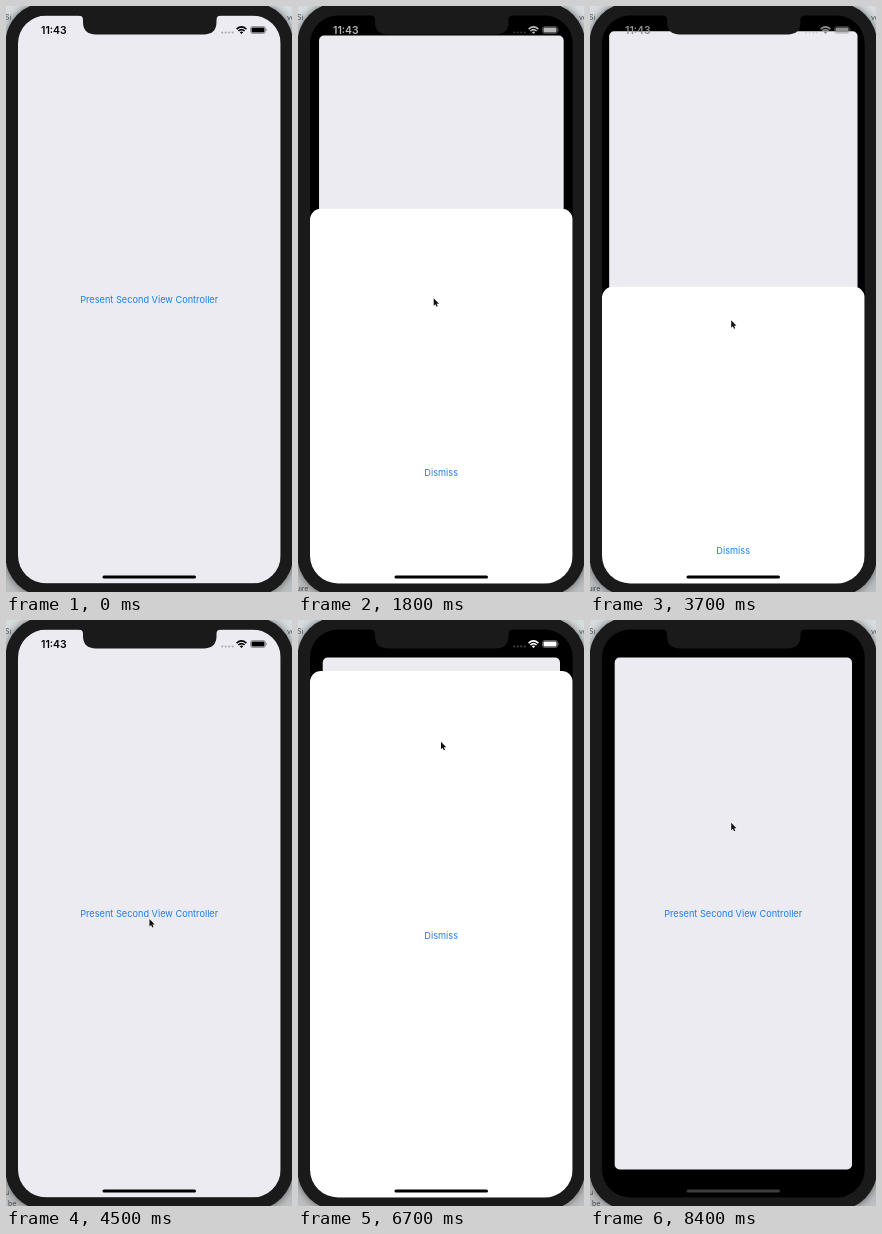
Animation, 286 px wide and 586 px high, one loop 8800 ms. Source, as an HTML page:

```html
<!DOCTYPE html>
<html lang="en">
<head>
<meta charset="utf-8">
<title>Modal sheet</title>
<style>
  html, body { margin: 0; width: 100%; height: 100%; overflow: hidden; background: #c4cacd; }
  svg { display: block; width: 286px; height: 586px; }
  text { font-family: Inter, Roboto, sans-serif; }
  .link { font-size: 9.2px; fill: #1a7ff0; text-anchor: middle; }
  .clock { font-size: 10.4px; font-weight: 600; }
  .desk { font-size: 7px; fill: #45484a; }
</style>
</head>
<body>
<svg viewBox="0 0 286 586">
  <defs>
    <clipPath id="screen"><rect x="12" y="9.5" width="262.7" height="568" rx="28"/></clipPath>
    <linearGradient id="desk" x2="0" y2="1">
      <stop offset="0" stop-color="#d6dde0"/>
      <stop offset="1" stop-color="#bcbfc1"/>
    </linearGradient>
    <filter id="soft" x="-10%" y="-10%" width="120%" height="120%">
      <feGaussianBlur stdDeviation="4"/>
    </filter>
  </defs>

  <rect width="286" height="586" fill="url(#desk)"/>
  <rect x="-.5" y="-3" width="287.5" height="593" rx="40" fill="#000" opacity=".55" filter="url(#soft)"/>
  <text class="desk" x="-1" y="14">Si</text>
  <text class="desk" x="281" y="14">ve</text>
  <text class="desk" id="logA" x="-2" y="585">uire</text>
  <g class="desk" id="logB"><text x="-1" y="575">u</text><text x="2" y="586">be</text></g>
  <rect x="-.5" y="-3" width="287.5" height="593" rx="40" fill="#1a1a1a"/>

  <g clip-path="url(#screen)">
    <rect width="286" height="586" fill="#000"/>
    <rect id="card" rx="5" fill="#ebebf1"/>
    <text class="link" id="present" x="143.2" y="297.1">Present Second View Controller</text>
    <g id="sheet">
      <rect x="12" width="262.7" height="640" rx="11" fill="#fff"/>
      <text class="link" id="dismiss" x="143.2" y="267.6">Dismiss</text>
    </g>
    <text class="clock" id="clock" x="35" y="27.6">11:43</text>
    <g id="icons">
      <path d="M216.2 26.5H227" fill="none" stroke="currentColor" stroke-width="2.2" stroke-linecap="round" stroke-dasharray="0 3.5" opacity=".28"/>
      <g fill="none" stroke="currentColor" stroke-width="1.6">
        <path d="M230.6 23.1Q235.5 18.8 240.4 23.1"/>
        <path d="M232.4 25Q235.5 22.3 238.6 25"/>
      </g>
      <path d="M233.8 26.2Q235.5 24.9 237.2 26.2L235.5 28Z"/>
      <rect x="244.5" y="20.5" width="15" height="7" rx="2" fill="none" stroke="currentColor" stroke-width=".7" opacity=".5"/>
      <rect x="245.5" y="21.5" width="13" height="5" rx="1.1"/>
      <path d="M260.4 22.6Q262 24 260.4 25.4Z" opacity=".5"/>
    </g>
    <rect id="home" x="96.5" y="569.5" width="93.5" height="3" rx="1.5"/>
  </g>
  <path d="M73 8.5V9.5Q77 9.5 77 14V16Q77 28.4 90 28.4H197.5Q210.5 28.4 210.5 16V14Q210.5 9.5 214.5 9.5V8.5Z" fill="#1a1a1a"/>
  <g id="cursor">
    <path transform="translate(.7 .3) scale(.88)" d="M0 0V8.4L1.9 6.7 3.2 9.7 4.6 9.1 3.3 6.2H6Z" fill="#111" stroke="#fff" stroke-width=".8" paint-order="stroke"/>
  </g>
</svg>

<script>
const LOOP = 8800, STEP = 100;
const OPEN = 51, CLOSED = 578, TRAVEL = CLOSED - OPEN;
const GRAB = 7050, RELEASE = 8100, HELD = 203;
const $ = id => document.getElementById(id);

const mix = (a, b, f) => a + (b - a) * f;
const part = (t, a, b) => Math.min(1, Math.max(0, (t - a) / (b - a)));
const within = (t, a, b) => t >= a && t < b;
const show = (id, on) => { $(id).style.opacity = on ? 1 : 0; };

const linear = f => f;
const smooth = f => f * f * (3 - 2 * f);
const easeIn = f => f * f;
const easeOut = f => 1 - (1 - f) ** 2;

// Critically damped, settled after 410 ms
function spring(ms) {
  if (ms <= 0) return 0;
  if (ms >= 410) return 1;
  const x = 0.013 * ms;
  return 1 - (1 + x) * Math.exp(-x);
}

function bezier(a, b, c, d, f) {
  const g = 1 - f;
  return g * g * g * a + 3 * g * g * f * b + 3 * g * f * f * c + f * f * f * d;
}

// Each leg continues from where the one before ended
const legs = [
  {from: 2500, to: 3000, x: 140.5, y: 314, bend: 5, ease: smooth},
  {from: 4100, to: 4600, x: 143, y: 297, bend: 0, ease: smooth},
  {from: 5700, to: GRAB, x: 142, y: 60, bend: 0, ease: linear},
  {from: GRAB, to: 7590, x: 140.5, y: 202.5, bend: 0, ease: easeOut}
];

function cursorAt(t) {
  const f = part(t, 200, 1000);
  let x = bezier(227, 150, 20, 135, f), y = bezier(374, 280, 270, 292, f);
  for (const leg of legs) {
    const s = leg.ease(part(t, leg.from, leg.to));
    x = mix(x, leg.x, s) + leg.bend * Math.sin(Math.PI * s);
    y = mix(y, leg.y, s);
  }
  return [x, y];
}

function sheetTop(t) {
  if (t > RELEASE) return mix(HELD, CLOSED, easeIn(part(t, RELEASE, 8400)));
  if (t > GRAB) return mix(OPEN, HELD, easeOut(part(t, GRAB, 7756)));
  const opened = spring(t - 1608) - spring(t - 3586) + spring(t - 5254);
  return CLOSED - TRAVEL * opened;
}

function cardDepth(t) {
  const follow = (CLOSED - sheetTop(Math.min(t, RELEASE))) / TRAVEL;
  return mix(follow, 1, part(t, RELEASE, 8400));
}

function draw(t) {
  const top = sheetTop(t), depth = cardDepth(t);
  const dx = 12.7 * depth, dy = 28 * depth;
  const box = {x: 12 + dx, y: 9.5 + dy, width: 262.7 - 2 * dx, height: 568 - 2 * dy};
  for (const k in box) $("card").setAttribute(k, box[k]);
  $("sheet").setAttribute("transform", `translate(0 ${top})`);

  const pressed = within(t, 1400, 1600) || within(t, 4800, 5200);
  $("present").style.opacity = pressed ? 0.25 : 1;
  $("dismiss").style.opacity = within(t, 3400, 3600) ? 0.3 : 1;

  const g = Math.round(255 * depth), ink = `rgb(${g},${g},${g})`;
  $("clock").style.fill = $("icons").style.fill = $("icons").style.color = ink;
  show("clock", t < 6700);
  show("icons", t < 7100);
  $("home").style.fill = t >= 8400 ? "#3c3c3c" : "#000";

  show("logA", within(t, 1400, 4200) || within(t, 7000, 8000));
  show("logB", within(t, 4200, 6200) || t >= 8000);

  const [x, y] = cursorAt(t);
  $("cursor").setAttribute("transform", `translate(${x} ${y})`);
  show("cursor", t >= 200);
}

const start = performance.now();
function tick() {
  const t = (performance.now() - start) % LOOP;
  draw(Math.floor(t / STEP) * STEP);
  requestAnimationFrame(tick);
}
draw(0);
requestAnimationFrame(tick);
</script>
</body>
</html>
```
